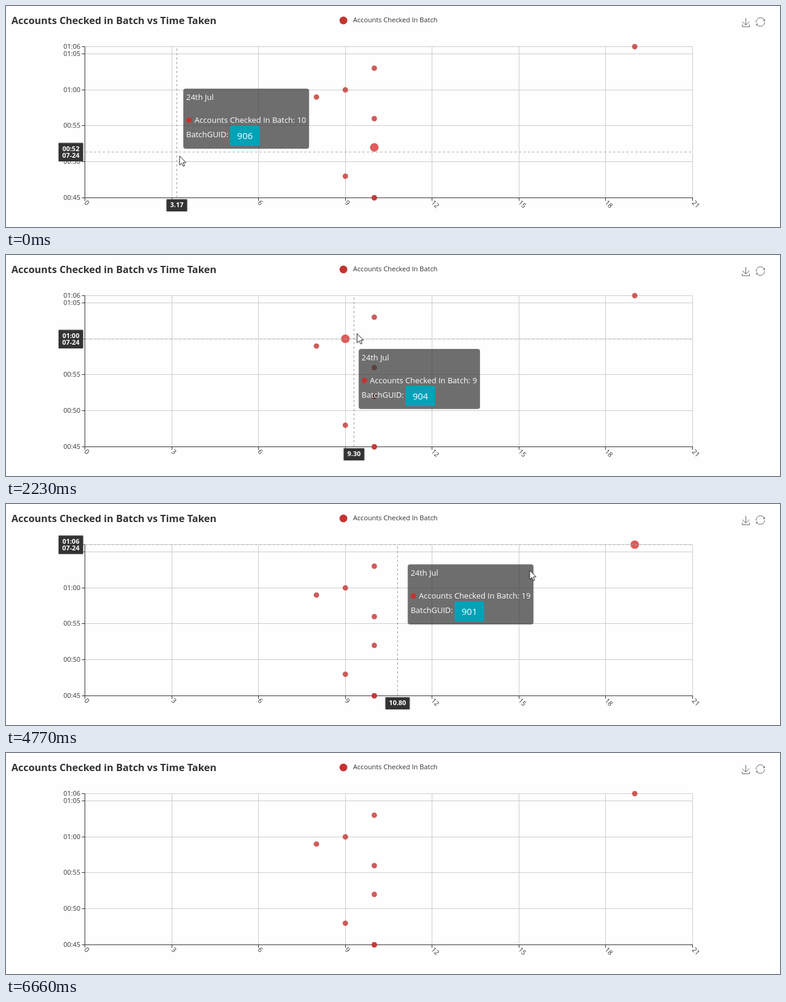
An HTML page that plays this animation: 1280x367 px, repeating every 7080 ms.

```html
<!DOCTYPE html>
<html lang="en">
<head>
<meta charset="utf-8">
<title>Scatter chart hover</title>
<style>
  html, body { margin: 0; width: 100%; height: 100%; overflow: hidden; background: #fefefe; }
  svg { display: block; width: 1280px; height: 367px; font-family: "Open Sans", "Noto Sans", sans-serif; }
  .badge { filter: drop-shadow(0 0 1.5px #aaa); }
</style>
</head>
<body>
<svg id="stage" viewBox="0 0 1280 367"></svg>
<script>
const LOOP = 7080;
const RED = '#c23531', LIFTED = '#dd5553', INK = '#333';
const LEFT = 130.5, RIGHT = 1135.5, TOP = 67.5, BOTTOM = 318.5;
const LEGEND_OFF = 3470, LEGEND_ON = 4010;

// accounts, minute, batch id
const points = [
  [19, 66, 901], [10, 63, 902], [9, 60, 904], [8, 59, 909],
  [10, 56, 905], [10, 52, 906], [9, 48, 908], [10, 45, 907], [10, 45, 907]
];

// time, x, y
const cursorPath = [
  [0, 287, 249], [700, 470, 165], [1260, 512.5, 151], [1700, 513, 151],
  [2230, 580.5, 130.5], [2780, 580, 72], [3060, 558.5, 25], [4130, 558.5, 25],
  [4530, 655, 68], [4770, 866, 110], [5060, 965, 150], [5570, 993, 197], [6660, 1019, 367]
];

// time, axis value, minute, tooltip offset from the pointer, tooltip top
const pointerPath = [
  [0, 3.17, 51.32, 11, 137.3], [430, 5.15, 55.6, 11, 205], [1260, 7.95, 59, 10.5, 169.3],
  [1700, 7.96, 59, 10.5, 169], [2230, 9.3, 60, 7.7, 156], [2780, 9.45, 66, 11, 94],
  [4530, 9.8, 66, 20, 88], [4770, 10.8, 66, 17, 100.3], [5060, 16.5, 59, 12, 155],
  [5570, 18, 56, 12.4, 196.3], [5970, 18.28, 48, 13, 165], [6660, 18.5, 45, 13, 200]
];

// step times: eight changes in a usual burst
const burst = (from, to, n = 8) => Array.from({ length: n }, (_, i) => from + (to - from) * i / (n - 1));
const steps = [
  0, ...burst(150, 1120), ...burst(1260, 2230), ...burst(2350, 3320), 3470,
  ...burst(3620, 4410, 7), 4530, 4650, ...burst(4770, 5570, 7), ...burst(5690, 6660)
];

const clamp = v => Math.max(0, Math.min(1, v));
const crisp = v => Math.floor(v) + .5;
const px = v => LEFT + v * (RIGHT - LEFT) / 21;
const py = m => BOTTOM - (m - 45) * (BOTTOM - TOP) / 21;
const clock = m => `0${Math.floor(m / 60)}:${String(m % 60).padStart(2, '0')}`;

const line = (x1, y1, x2, y2, color, extra = '') =>
  `<path d="M${x1} ${y1}L${x2} ${y2}" stroke="${color}" fill="none" ${extra}/>`;
const circle = (x, y, r, color, alpha = 1) =>
  `<circle cx="${x}" cy="${y}" r="${r}" fill="${color}" opacity="${alpha}"/>`;
const rect = (x, y, w, h, color, r = 0) =>
  `<rect x="${x}" y="${y}" width="${w}" height="${h}" rx="${r}" fill="${color}"/>`;
// y is the middle of the capitals
const text = (str, x, y, size, color = INK, extra = '') =>
  `<text x="${x}" y="${y + size * .36}" font-size="${size}" fill="${color}" ${extra}>${str}</text>`;
const MIDDLE = 'text-anchor="middle" ', BOLD = 'font-weight="700"';

function header(off) {
  return text('Accounts Checked in Batch vs Time Taken', 9, 24.5, 16.4, INK, BOLD)
    + circle(558, 24, 6.5, off ? '#ccc' : RED)
    + (off ? text('Accounts Checked In Batch', 574, 23.3, 10.5, '#ccc', BOLD)
           : text('Accounts Checked In Batch', 574, 23.3, 11.15))
    + `<path fill="none" stroke="#666" d="M1217.5 26l6 5.5l6-5.5M1217.5 31v3.5h12V31M1223.5 31V20
        M1252 24.5h2.5v-2.5M1254.5 24.5A7.2 7.2 0 0 0 1240.5 27.5
        M1243.5 30h-2.5v2.5M1241 30A7.2 7.2 0 0 0 1254.5 27"/>`;
}

function grid() {
  let out = '';
  for (const m of [45, 50, 55, 60, 65, 66]) {
    const y = crisp(py(m));
    out += line(LEFT, y, RIGHT, y, '#ccc') + line(LEFT - 5, y, LEFT, y, INK)
      + text(clock(m), 123, y - .5, 11, INK, 'text-anchor="end"');
  }
  for (let v = 0; v <= 21; v += 3) {
    const x = crisp(px(v));
    out += line(x, TOP, x, BOTTOM, '#ccc') + line(x, BOTTOM, x, BOTTOM + 5, INK)
      + `<g transform="translate(${x + 1} 324.5) rotate(45)">${text(v, 0, 0, 11)}</g>`;
  }
  return out;
}

const axes = () => line(LEFT, TOP, LEFT, BOTTOM, INK) + line(LEFT - .5, BOTTOM, RIGHT + .5, BOTTOM, INK);

function dots(scale, isActive) {
  return points.map(p => {
    const active = isActive(p);
    return circle(px(p[0]), py(p[1]), (active ? 7.1 : 4.5) * scale,
      active ? LIFTED : RED, (active ? .96 : .8) * scale);
  }).join('');
}

function crosshair(value, minute, label) {
  const x = crisp(px(value)), y = crisp(py(minute)), shown = value.toFixed(2);
  const w = shown.length > 4 ? 40 : 34;
  const dash = 'stroke-dasharray="3.7 3.7"';
  const caption = (str, cx, cy) => text(str, cx, cy, 11, '#fff', MIDDLE + BOLD);
  return line(LEFT, y, RIGHT, y, '#aaa', dash) + line(x, BOTTOM, x, TOP, '#999', dash)
    + `<g class="badge">${rect(87, y - 15, 40.5, 30.5, INK)}${rect(x - w / 2, 321, w, 20, INK)}</g>`
    + caption(label, 107.3, y - 5.5) + caption('07-24', 107.3, y + 5.2) + caption(shown, x, 330.5);
}

function tooltip(x, y, [accounts, , id]) {
  const width = 193.2 + 7.4 * String(accounts).length;
  return `<g transform="translate(${x} ${y})">`
    + rect(0, 0, width, 99.7, 'rgba(50,50,50,.7)', 4)
    + text('24th Jul', 4.8, 14.5, 13, '#fff')
    + circle(9.4, 52.2, 4.6, RED)
    + text(`Accounts Checked In Batch: ${accounts}`, 18.5, 52, 13, '#fff')
    + text('BatchGUID:', 4.8, 76.5, 13, '#fff')
    + rect(77.5, 61.3, 49, 33.7, '#00a2b8', 3)
    + text(id, 102, 78.7, 15, '#fff', MIDDLE) + '</g>';
}

function cursor(x, y, hand) {
  const shape = hand
    ? 'M-2 12V2a2 2 0 0 1 4 0V8l5 1q2 1 2 3q0 4-1.5 6v3h-8q-1-3-3.5-5l-2.5-4q-.5-2 1-2.5q1 0 3.5 2M2 8v4M6 9v3'
    : 'M0 0V15.3L3.6 12L6 17.3L8.4 16.2L6 11.1H10.6Z';
  return `<path transform="translate(${x} ${y})" d="${shape}" fill="#fff" stroke="#222" stroke-linejoin="round"/>`;
}

function sample(path, t) {
  const i = Math.max(1, path.findIndex(row => row[0] >= t));
  const a = path[i - 1], b = path[i], k = (t - a[0]) / (b[0] - a[0]);
  return a.slice(1).map((v, j) => v + (b[j + 1] - v) * k);
}

function scene(t) {
  const [cx, cy] = sample(cursorPath, t);
  const [value, minute, offset, tipY] = sample(pointerPath, t);
  const off = t >= LEGEND_OFF && t < LEGEND_ON;
  const hovering = t < 2760 || (t > 4500 && t < 6350);
  const onLegend = t > 3000 && t < LEGEND_OFF;
  const scale = t < LEGEND_ON ? clamp((3715 - t) / 250) : clamp((t - LEGEND_ON + 60) / 300);
  const nearest = points.reduce((best, p) =>
    Math.abs(p[1] - minute) < Math.abs(best[1] - minute) ? p : best);
  const overDot = scale === 1 && points.some(p => Math.hypot(px(p[0]) - cx, py(p[1]) - cy) < 7);
  return header(off) + (off ? '' : grid()) + axes()
    + dots(scale, p => onLegend || (hovering && p[1] === nearest[1]))
    + (hovering ? crosshair(value, minute, clock(nearest[1])) + tooltip(px(value) + offset, tipY, nearest) : '')
    + (t < 6600 ? cursor(cx, cy, overDot || cy < 32) : '');
}

const stage = document.getElementById('stage');
const start = performance.now();
let drawn = -1;

function play() {
  const now = (performance.now() - start) % LOOP;
  const step = steps.filter(s => s <= now).pop();
  if (step !== drawn) {
    stage.innerHTML = scene(step);
    drawn = step;
  }
  requestAnimationFrame(play);
}
play();
</script>
</body>
</html>
```
